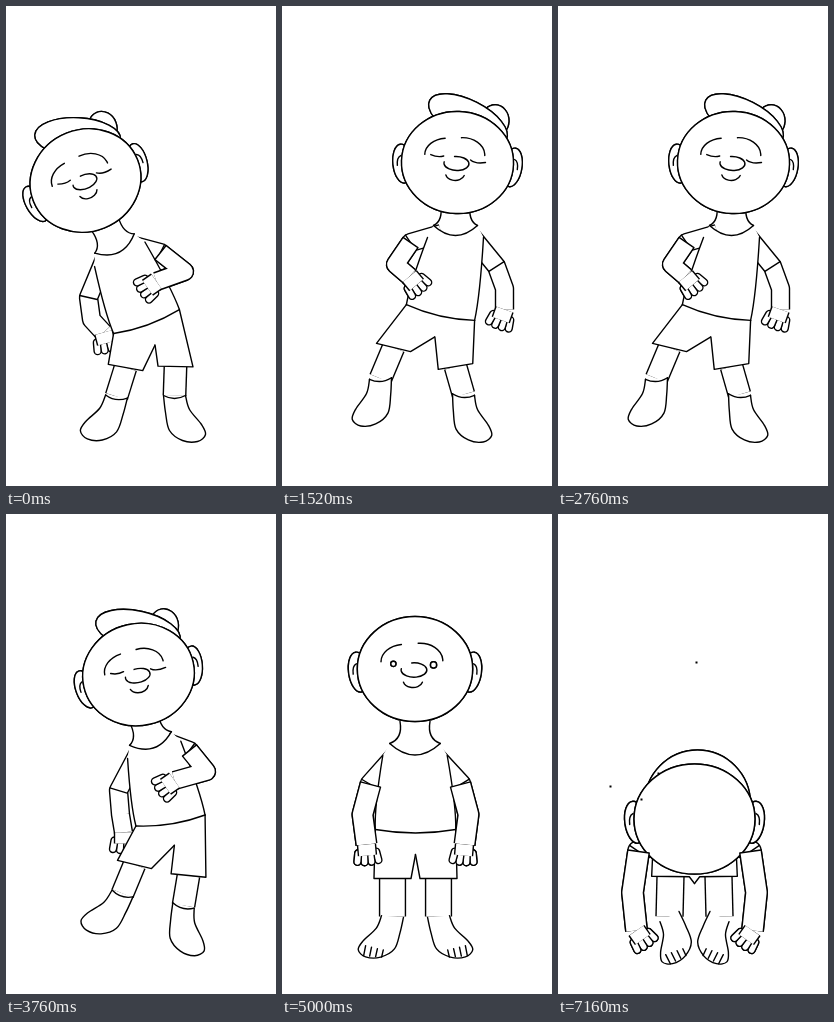
Animation of 270x480 px, one loop 7600 ms. Source, as an HTML page with a canvas:

```html
<!DOCTYPE html>
<html lang="en">
<head>
<meta charset="utf-8">
<title>Dancing boy</title>
<style>
html, body { margin: 0; width: 100%; height: 100%; overflow: hidden; background: #fff; }
canvas { display: block; }
</style>
</head>
<body>
<canvas id="stage" width="270" height="480"></canvas>
<script>
const ctx = document.getElementById('stage').getContext('2d');
const LOOP = 7600, DANCE_END = 5000, LINE = 1.4, RAD = Math.PI / 180;

// Joint angles are in degrees; foot angles turn outward on both sides.
const arm = (cuff, elbow, wrist, hand, front = 1) => ({ cuff, elbow, wrist, hand, front });
const leg = (thigh, ankle, foot) => ({ thigh, ankle, foot });

// head: x, y, tilt, size; chest and hips: x, y, tilt
const lean = {
  head: [79, 174, -22, 1], chest: [108, 237, -26], hips: [140, 315, -20], girth: 1, back: 0,
  arms: [arm([82, 291], [85, 313], [97, 326], 75, 0), arm([154, 246], [178, 265], [150, 275], 145)],
  legs: [leg([119, 361], [110, 390], 8), leg([169, 360], [168, 389], 0)]
};
const step = {
  head: [132, 160, -12.5, 1], chest: [144, 224, -18], hips: [164, 306, -9], girth: 1, back: 0,
  arms: [arm([112, 276], [114, 300], [117, 318], 90, 0), arm([183, 236], [200, 257], [168, 266], 145)],
  legs: [leg([128, 350], [116, 379], 18), leg([182, 361], [177, 391], -14)]
};
const kick = {
  head: [175, 156, 2, 1], chest: [173, 219, 0], hips: [158, 306, 13], girth: 1, back: 0,
  arms: [arm([128, 236], [113, 258], [127, 270], 50), arm([214, 260], [222, 282], [222, 303], 110, 0)],
  legs: [leg([111, 341], [98, 372], -4), leg([173, 360], [181, 388], -4)]
};

function mirror(p, sum) {
  const at = ([x, y]) => [sum - x, y];
  const turn = ([x, y, tilt, ...rest]) => [sum - x, y, -tilt, ...rest];
  return {
    ...p, head: turn(p.head), chest: turn(p.chest), hips: turn(p.hips),
    arms: p.arms.map(a => arm(at(a.cuff), at(a.elbow), at(a.wrist), 180 - a.hand, a.front)).reverse(),
    legs: p.legs.map(l => leg(at(l.thigh), at(l.ankle), l.foot)).reverse()
  };
}

function mix(a, b, t) {
  if (typeof a === 'number') return a + (b - a) * t;
  if (Array.isArray(a)) return a.map((v, i) => mix(v, b[i], t));
  return Object.fromEntries(Object.keys(a).map(k => [k, mix(a[k], b[k], t)]));
}

// Pose facing forward, the right half copied from the left
function facing(leftArm, change = {}) {
  const p = {
    head: [132.5, 154.5, 0, 1.03], chest: [132.5, 229, 0], hips: [133, 315, 0], girth: 1.15, back: 0,
    legs: [leg([110, 364], [110, 402], 5)], ...change, arms: [leftArm]
  };
  const twin = mirror(p, 2 * p.hips[0]);
  return { ...p, arms: [...p.arms, ...twin.arms], legs: [...p.legs, ...twin.legs] };
}
const rest = facing(arm([88, 270], [80, 300], [84, 330], 85));
const hands = facing(arm([80, 238], [51, 198], [82, 112], -25));
const shoulders = facing(arm([84, 262], [54, 284], [76, 228], -15));
const knees = facing(arm([80, 300], [74, 335], [90, 365], 60),
  { head: [134, 221, 0, 1.05], chest: [133, 250, 0], hips: [133, 322, 0], back: .4 });
const toes = facing(arm([80, 337], [74, 378], [78, 416], 55), {
  head: [136, 304.5, 0, 1.08], chest: [136, 302, 0], hips: [136, 344, 0], girth: 1.2, back: 1,
  legs: [leg([112, 362], [111, 402], -30)]
});

function place([x, y, deg], dx, dy) {
  const c = Math.cos(deg * RAD), s = Math.sin(deg * RAD);
  return [x + dx * c - dy * s, y + dx * s + dy * c];
}

function line(...pts) {
  ctx.beginPath();
  pts.forEach(p => ctx.lineTo(...p));
  ctx.stroke();
}

function bow(a, control, b) {
  ctx.beginPath();
  ctx.moveTo(...a);
  ctx.quadraticCurveTo(...control, ...b);
  ctx.stroke();
}

function arc(x, y, rx, ry, from = 0, to = 360, turn = 0) {
  ctx.beginPath();
  ctx.ellipse(x, y, rx, ry, turn * RAD, from * RAD, to * RAD);
  ctx.stroke();
}

function oval(x, y, rx, ry, turn) {
  arc(x, y, rx, ry, 0, 360, turn);
  ctx.fill();
  ctx.stroke();
}

// Outlined limb: a wide dark line with a narrower white one inside
function tube(pts, width, cap = 'butt') {
  ctx.save();
  ctx.lineCap = cap;
  ctx.lineWidth = width + LINE;
  line(...pts);
  ctx.strokeStyle = '#fff';
  ctx.lineWidth = width - LINE;
  line(...pts);
  ctx.restore();
}

// Smooth closed or open outline through a few points
function curve(pts) {
  ctx.beginPath();
  ctx.moveTo(...pts[0]);
  for (let i = 0; i < pts.length - 1; i++) {
    const b = pts[i], c = pts[i + 1], a = pts[i - 1] || b, d = pts[i + 2] || c;
    ctx.bezierCurveTo(b[0] + (c[0] - a[0]) / 6, b[1] + (c[1] - a[1]) / 6,
      c[0] - (d[0] - b[0]) / 6, c[1] - (d[1] - b[1]) / 6, ...c);
  }
  ctx.fill();
  ctx.stroke();
}

const SHOE = [[-11, 0], [-15, 14], [-27, 29], [-31, 39], [-23, 46], [-8, 45], [5, 35], [9, 17], [11, 0]];

function drawLeg({ thigh, ankle, foot }, side, girth, bare) {
  tube([thigh, ankle], 22.5 * girth);
  ctx.save();
  ctx.translate(...ankle);
  ctx.scale(-side, bare ? .92 : 1);
  ctx.rotate(foot * RAD);
  curve(SHOE);
  if (bare) for (let i = 0; i < 4; i++) line([-24 + 6 * i, 34 + i], [-25 + 6 * i, 45]);
  else bow([-11, 0], [0, 6], [11, 0]);
  ctx.restore();
}

function drawHand(wrist, deg) {
  const frame = [...wrist, deg];
  for (let i = -1.5; i < 2; i++) tube([place(frame, 8, i * 6), place(frame, 18 - Math.abs(i), i * 7)], 7, 'round');
  tube([wrist, place(frame, 11, 0)], 18);
}

function drawArm({ cuff, elbow, wrist, hand }, shoulder, girth) {
  const width = 18 * girth;
  tube([...shoulder, cuff, elbow, wrist], width);
  drawHand(wrist, hand);
  const start = shoulder[0] || cuff;
  const deg = Math.atan2(elbow[1] - start[1], elbow[0] - start[0]) / RAD;
  line(place([...cuff, deg], 0, -width / 2), place([...cuff, deg], 0, width / 2));
}

function drawShorts({ hips, legs, girth }) {
  const crotch = place(hips, 0, 25);
  legs.forEach(({ thigh, ankle }, i) => {
    const side = i ? 1 : -1;
    const deg = .6 * Math.atan2(thigh[0] - ankle[0], ankle[1] - thigh[1]) / RAD;
    const hem = [...thigh, deg], w = 17.5 * girth ** .4;
    const edge = [place(hips, side * 35 * girth, 0), place(hem, side * w, 0), place(hem, -side * w, 0), crotch];
    ctx.beginPath();
    [...edge, hips.slice(0, 2)].forEach(p => ctx.lineTo(...p));
    ctx.fill();
    line(...edge);
  });
}

function drawShirt({ chest, hips, girth: g }) {
  const collar = s => place(chest, s * 22 * g, 0);
  const pit = s => place(chest, s * 28 * g, 12);
  const waist = s => place(hips, s * 35 * g, 0);
  const bulge = s => mix(pit(s), place(hips, s * 39 * g, 0), .7);
  const dip = place(chest, 0, 20 * g), hem = place(hips, 0, 7);
  ctx.beginPath();
  ctx.moveTo(...collar(-1));
  ctx.lineTo(...pit(-1));
  ctx.quadraticCurveTo(...bulge(-1), ...waist(-1));
  ctx.quadraticCurveTo(...hem, ...waist(1));
  ctx.quadraticCurveTo(...bulge(1), ...pit(1));
  ctx.lineTo(...collar(1));
  ctx.quadraticCurveTo(...dip, ...collar(-1));
  ctx.fill();
  for (const s of [-1, 1]) {
    bow(pit(s), bulge(s), waist(s));
    bow(place(chest, s * 15, -22), place(chest, s * 12, -5), collar(s));
  }
  bow(waist(-1), hem, waist(1));
  bow(collar(-1), dip, collar(1));
}

function drawFace(bare) {
  arc(-10, -7, 23, 17, 180, 262);
  arc(5, -8, 22, 17, 265, 360);
  arc(-1, 1, 12.5, 7, -100, 190);
  arc(-2, 11, 9.5, 7, 15, 165);
  if (bare) {
    oval(-21, -5, 2.5, 2.5);
    oval(18, -4, 3, 3);
  } else {
    bow([-27, -7], [-20, -4], [-14, -6]);
    bow([13, -3], [18, 1], [28, -1]);
  }
}

function drawHead([x, y, tilt, size], back, { bare, flip, face }) {
  if (back) oval(x + 3 * back, y - 15 * back, 53, 54);
  ctx.save();
  ctx.translate(x, y);
  ctx.rotate(tilt * RAD);
  ctx.scale(flip ? -size : size, size);
  for (const s of [-1, 1]) {
    oval(s * 55, 3, 9.5, 19.5, s * 8);
    bow([s * 57, -5], [s * 61, -3], [s * 60, 5]);
  }
  if (!bare) {
    oval(36, -43, 14, 16);
    oval(9, -43, 43, 19.5, 25);
  }
  oval(0, 0, 56, 51);
  ctx.translate(0, 25 * back);
  if (face) drawFace(bare);
  ctx.restore();
}

function drawFigure(p, look) {
  const { arms, legs, chest, girth } = p;
  arms.forEach((a, i) => drawArm(a, [place(chest, (i ? 14 : -14) * girth, 8 * girth)], girth));
  legs.forEach((l, i) => drawLeg(l, i ? 1 : -1, girth, look.bare));
  drawShorts(p);
  drawShirt(p);
  drawHead(p.head, p.back, look);
  arms.filter(a => a.front > .5).forEach(a => drawArm(a, [], girth));
}

// Fifteen drawings a round: a deep lean, then seven steps and their mirror image
function dance(t) {
  const u = t % 2480;
  const held = 40 * ((u >= 320) + (u >= 1560));
  const beat = Math.min(29, Math.floor((u + 40 - held) / 80)) % 15;
  const look = { face: true, flip: false };
  if (!beat) return drawFigure(lean, look);
  const n = (beat - 1) % 7 + 1, back = beat > 7;
  const sway = mirror(mix(step, lean, .7), 283);
  let p = n <= 4 ? mix(step, kick, (n - 1) / 3) : mix(kick, sway, (n - 4) / 3);
  if (back) p = mirror(p, 283);
  look.flip = (n >= 6) !== back;
  if (n < 4) ctx.translate(0, -12 * Math.sin((n - 1) / 3 * Math.PI));
  drawFigure(p, look);
}

// Each move starts at a time and takes a few 80 ms steps; specks show once it is held
const MOVES = [
  { start: 7000, steps: 3, lead: 1, from: knees, to: toes, specks: [[138, 148], [52, 272], [83, 285], [100, 259]] },
  { start: 6120, steps: 4, lead: 1, from: shoulders, to: knees, specks: [] },
  { start: 5600, steps: 3, lead: 1, from: hands, to: shoulders, specks: [[51, 157], [98, 109]] },
  { start: 5000, steps: 5, lead: 0, from: rest, to: hands, specks: [] }
];

function exercise(t) {
  const { start, steps, lead, from, to, specks } = MOVES.find(m => t >= m.start);
  const k = Math.min(1, (Math.floor((t - start) / 80) + lead) / steps);
  drawFigure(mix(from, to, k), { bare: true, face: to !== toes });
  ctx.fillStyle = '#000';
  if (k === 1) specks.forEach(([x, y]) => ctx.fillRect(x - 1, y - 1, 2, 2));
}

function frame() {
  const t = performance.now() % LOOP;
  ctx.setTransform(1, 0, 0, 1, 0, 0);
  ctx.fillStyle = '#fff';
  ctx.fillRect(0, 0, 270, 480);
  ctx.translate(.5, .5);
  ctx.strokeStyle = '#000';
  ctx.lineWidth = LINE;
  ctx.lineCap = ctx.lineJoin = 'round';
  (t < DANCE_END ? dance : exercise)(t);
  requestAnimationFrame(frame);
}
frame();
</script>
</body>
</html>
```
